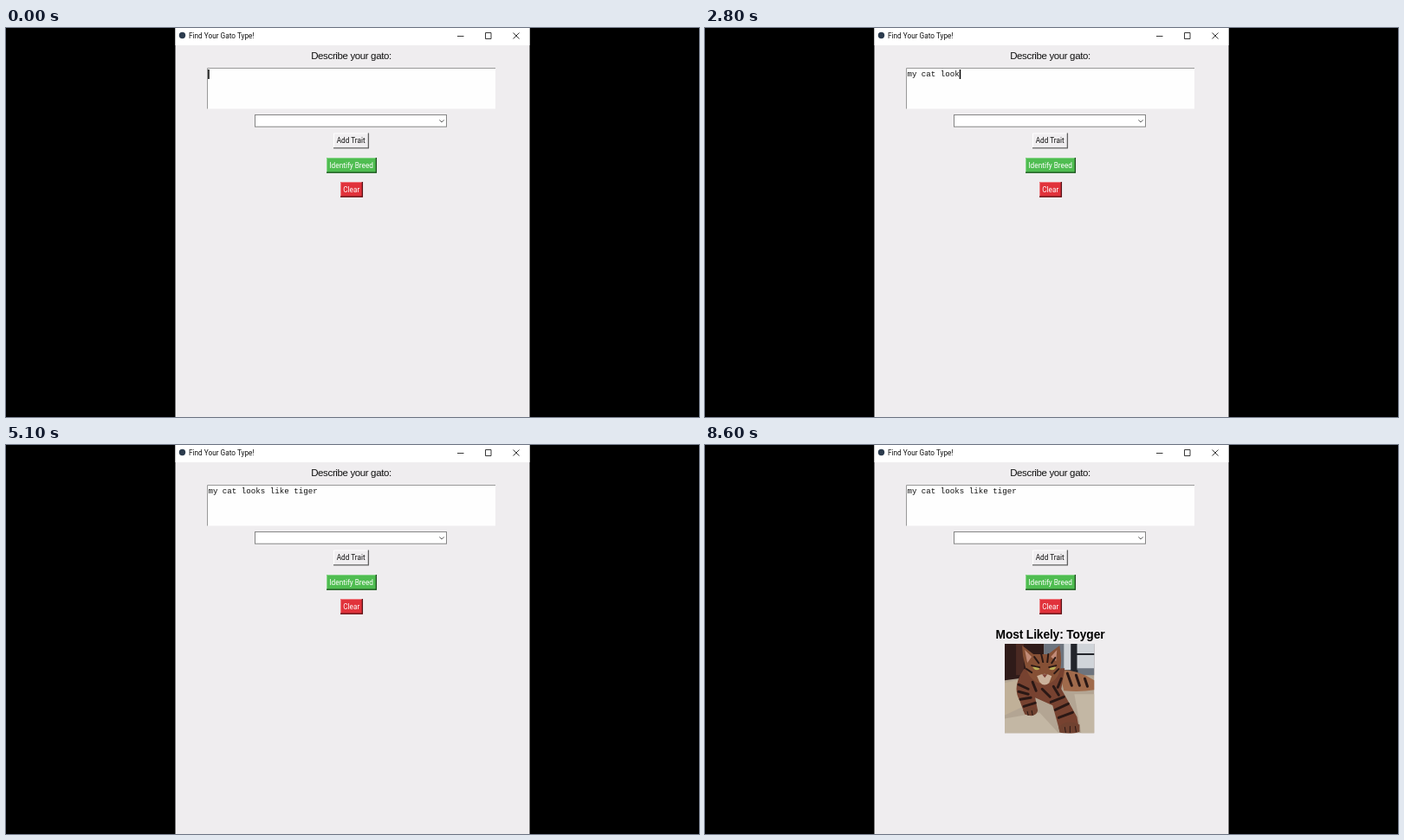
These frames come from a looping animation (800x450 px, 8650 ms). An HTML page:

```html
<!DOCTYPE html>
<html lang="en">
<head>
<meta charset="utf-8">
<title>Cat breed finder</title>
<style>
  html, body { margin: 0; width: 100%; height: 100%; overflow: hidden; background: #000; }
  svg { display: block; width: 100vw; height: 100vh; }
  text { font: 8.25px Roboto, "Open Sans", sans-serif; fill: #111; white-space: pre; }
  .mid { text-anchor: middle; }
  .label { font: 11.5px "Liberation Sans", Arial, sans-serif; letter-spacing: -.37px; }
  .result { font: bold 13.8px "Liberation Sans", Arial, sans-serif; letter-spacing: -.14px; fill: #000; }
  .mono { font: 9.17px "Liberation Mono", "Courier New", monospace; }
  .light { fill: #fff; }
  .line { fill: none; stroke: #222; stroke-width: .9; }
  .stripe { fill: none; stroke: #2a1815; stroke-linecap: round; }
</style>
</head>
<body>
<svg viewBox="0 0 800 450">
  <rect width="800" height="450"/>
  <rect x="195.5" width="409" height="450" fill="#efedef"/>
  <rect x="195.5" width="409" height="20" fill="#fff"/>
  <circle cx="203.5" cy="8.5" r="3.7" fill="#2b3b4d"/>
  <text x="211" y="12.2">Find Your Gato Type!</text>
  <path class="line" d="M521 9.5h7.5M553.5 5.5h6.5v7h-6.5zM585.5 5.5l7 7m0-7l-7 7"/>

  <text class="label mid" x="398.5" y="35.7">Describe your gato:</text>
  <rect x="232" y="46" width="333" height="47.5" fill="#fefefe"/>
  <path d="M232.5 93.5V46.5H565" fill="none" stroke="#989898"/>
  <text class="mono" id="typed" x="233.4" y="56.3"></text>
  <rect id="caret" y="48" width="1.5" height="11"/>

  <rect x="287.5" y="100.5" width="221" height="13.7" fill="#fff" stroke="#858585"/>
  <path class="line" d="M500.3 106.3l2.7 2.7 2.7-2.7" style="stroke:#555"/>

  <g id="buttons"></g>

  <g id="result">
    <text class="result mid" x="398.5" y="224">Most Likely: Toyger</text>
    <svg x="346" y="230" width="103.5" height="103.5" viewBox="0 0 103 103">
      <rect width="103" height="103" fill="#b3a593"/>
      <path d="M0 0h45v36l-45 6z" fill="#2f1b19"/>
      <path d="M13 0h9v36h-9z" fill="#4b2a23"/>
      <path d="M45 0h58v36H45z" fill="#6d747e"/>
      <path d="M68 0h8v32h-8zM83 0h20v28H83z" fill="#d0d4d9"/>
      <path d="M76 0h7v34h-7zM64 30h20v7H64zM83 11h20v2H83z" fill="#22242a"/>
      <path d="M0 45l22-5v32L0 82z" fill="#c0b098"/>
      <path d="M0 86l40-7 22 24H0zM80 58h23v45H88z" fill="#c3b7a4"/>
      <path d="M62 30Q82 29 103 42v11Q86 56 68 54z" fill="#a06a4b"/>
      <path d="M22 29Q8 49 17 65l6 16q10 4 15-4l-3-15 20 9 8 29q12 6 23 1l-3-17-18-32 4-24z" fill="#774230"/>
      <path d="M20 2l13 10h17L63 2q3 16 1 26-3 16-18 19-15-2-21-17-5-14-5-28z" fill="#865035"/>
      <path d="M23 7l8 8-5 7zM60 7l-7 8 6 5z" fill="#c18b78"/>
      <path d="M37 37q9-5 17 0l-3 8q-6 5-11-1z" fill="#cbb29c"/>
      <path d="M43 35h6l-3 4z" fill="#7e4136"/>
      <path d="M32 27q5-4 8 2-4 3-8-2zM51 29q3-5 8-2-3 5-8 2z" fill="#b9ad54"/>
      <path class="stripe" stroke-width="2" d="M34 15l5 7M42 12l2 9M50 12l-1 9M58 16l-4 6M25 29l6 4M62 29l-5 5M31 25l9 2M51 27l8-2"/>
      <path class="stripe" stroke-width="3" d="M16 47l11 5M16 55l11 3M18 64l12-2M22 72l13-4M32 44l4 10M43 52l9 9M56 49l6 10M65 40l-4 10M53 67l15-6M58 76l15-7M62 85l16-6M72 34l5 14M82 36l4 12M92 40l3 9"/>
      <path d="M21 77q8-8 17-1-1 9-12 6zM62 96q9-10 24-3v8q-11 4-23 1z" fill="#704230"/>
      <path class="stripe" stroke-width="1" d="M26 78l1 4M31 77l1 5M69 96l1 6M75 95v7M81 95l1 6"/>
    </svg>
  </g>
</svg>
<script>
const LOOP = 8650, RESULT_AT = 5300, CHAR = 5.503;
const message = "my cat looks like tiger";
const keyTimes = [450, 650, 850, 1000, 1150, 1300, 1550, 1700, 2200, 2500, 2750, 2950,
  3100, 3250, 3400, 3550, 3750, 3900, 4100, 4400, 4600, 4800, 4950];
const $ = id => document.getElementById(id);

// Raised button: light top and left edges, dark bottom and right edges.
function button(x, y, w, h, fill, edge, dark, label, cls) {
  return `<rect x="${x}" y="${y}" width="${w}" height="${h}" fill="${fill}"/>
    <path d="M${x + .5} ${y + h}V${y + .5}H${x + w}" fill="none" stroke="${edge}"/>
    <path d="M${x} ${y + h - .6}H${x + w - .6}V${y}" fill="none" stroke="${dark}" stroke-width="1.3"/>
    <text class="mid ${cls}" x="${x + w / 2 - .3}" y="${y + h / 2 + 2.7}">${label}</text>`;
}

$("buttons").innerHTML =
  button(378, 121.5, 41, 18, "#f0eef0", "#fff", "#606060", "Add Trait", "") +
  button(370, 150, 58, 17.8, "#4fbd51", "#8ad58b", "#1d4d1e", "Identify Breed", "light") +
  button(386, 178, 26, 17.8, "#e1323b", "#ee7b81", "#561216", "Clear", "light");

function draw(now) {
  const t = now % LOOP;
  const count = keyTimes.filter(k => k <= t).length;
  $("typed").textContent = message.slice(0, count);
  $("caret").setAttribute("x", 233.2 + count * CHAR);
  // The caret shows for 600 ms, then hides for 300 ms.
  $("caret").style.display = (t + 200) % 900 < 600 ? "" : "none";
  $("result").style.display = t >= RESULT_AT ? "" : "none";
}

let start;
function tick(now) {
  start ??= now;
  draw(now - start);
  requestAnimationFrame(tick);
}
draw(0);
requestAnimationFrame(tick);
</script>
</body>
</html>
```
